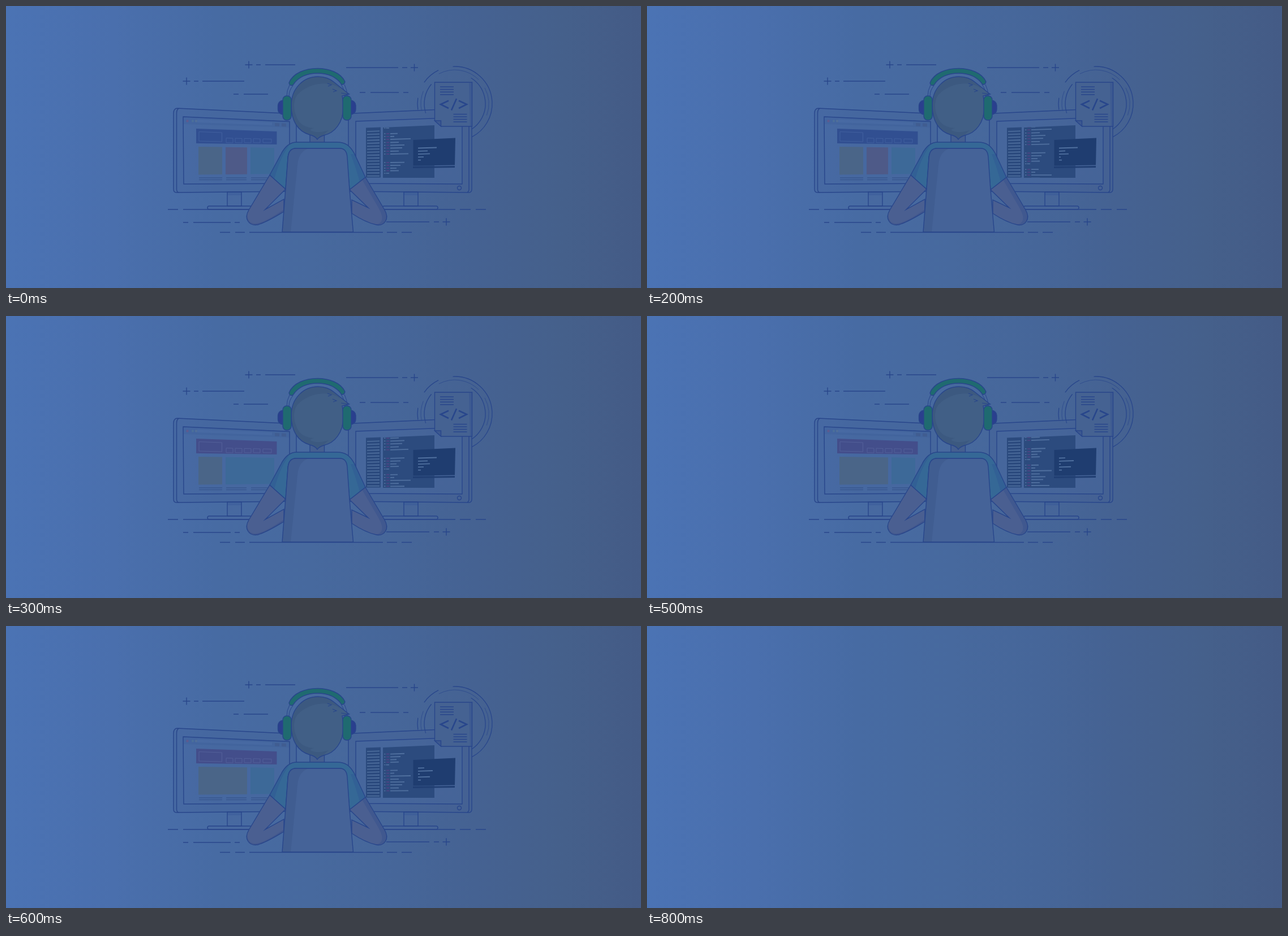
Recreate the animation shown at these times as an HTML page with a canvas. Size 1122x499 px, loop 0.9 s.

```html
<!DOCTYPE html>
<html lang="en">
<head>
<meta charset="utf-8">
<title>Developer at work</title>
<style>
html, body { margin: 0; width: 100%; height: 100%; overflow: hidden; background: #476a9f; }
canvas { display: block; width: 1122px; height: 499px; }
</style>
</head>
<body>
<canvas id="stage" width="1122" height="499"></canvas>
<script>
const ctx = document.getElementById('stage').getContext('2d');
const INK = '#28468b', GREEN = '#1f6a70', TEAL = '#356896', SKIN = '#4a5f91', PALE = '#50709f';
const OLIVE = '#4a6588', RED = '#4e5a88', AQUA = '#3d6998';
const STEP = 100, STEPS = 9;

function path(d, fill, stroke = INK, width = 1.4) {
  const p = new Path2D(d);
  if (fill) { ctx.fillStyle = fill; ctx.fill(p); }
  if (stroke) { ctx.strokeStyle = stroke; ctx.lineWidth = width; ctx.stroke(p); }
}

function box(x, y, w, h, r, fill, stroke = INK) {
  const p = new Path2D();
  p.roundRect(x, y, w, h, r);
  if (fill) { ctx.fillStyle = fill; ctx.fill(p); }
  if (stroke) { ctx.strokeStyle = stroke; ctx.lineWidth = 1.4; ctx.stroke(p); }
}

function arc(r, from, to, width) {
  ctx.beginPath();
  ctx.arc(793, 173, r, from * Math.PI / 180, to * Math.PI / 180);
  ctx.strokeStyle = INK;
  ctx.lineWidth = width;
  ctx.stroke();
}

const row = (y, ...spans) => {
  for (let i = 0; i < spans.length; i += 2) path(`M${spans[i]} ${y}H${spans[i + 1]}`, null, INK, 1.5);
};
const plus = (x, y) => path(`M${x - 6.5} ${y}h13M${x} ${y - 6.5}v13`);

function background() {
  const g = ctx.createLinearGradient(0, 0, 1122, 0);
  [[0, '#4b73b4'], [.17, '#4a6fad'], [.33, '#476ba3'], [.48, '#47699e'],
   [.62, '#466699'], [.74, '#456292'], [.88, '#45608b'], [1, '#445b86']]
    .forEach(([at, color]) => g.addColorStop(at, color));
  ctx.fillStyle = g;
  ctx.fillRect(0, 0, 1122, 499);
}

function surroundings() {
  plus(429, 104); row(104, 442, 450, 458, 511);
  plus(319, 133); row(133, 332, 340, 347, 421);
  row(156, 402, 411, 420, 463);
  row(109, 601, 693, 700, 709); plus(721.5, 109);
  row(153, 625, 635, 644, 694, 702, 711);
  row(360, 286, 304, 313, 432, 668, 794, 802, 821, 830, 848);
  row(383, 313, 322, 331, 397, 404, 413);
  row(382, 672, 748, 756, 765); plus(778, 382);
  row(400.5, 378, 396, 405, 422, 430, 666, 673, 691, 699, 717);
  arc(66, -93, 63, 1.3);
  arc(66, 215, 244, 1.3);
  arc(66, 171, 189, 1.3);
  arc(60, 242, 315, .7);
  arc(60, -28, 20, .7);
  arc(60, 168, 202, .7);
  arc(54, 162, 220, 1.3);
  arc(54, -58, 57, 1.3);
}

function stand(x, baseX, baseW) {
  box(x, 329, 25, 25, 0, 'rgba(70,100,155,.3)');
  ctx.fillStyle = 'rgba(39,69,143,.2)';
  ctx.fillRect(x, 329, 25, 6);
  box(baseX, 354, baseW, 6, 3, 'rgba(70,100,155,.3)');
}

function monitors() {
  stand(391, 356, 87);
  stand(703, 665, 98);

  const frame = 'rgba(64,92,148,.25)', screen = 'rgba(76,110,165,.2)';
  path('M303 181L505 190.500Q513 191 513 200V328L301 330Q296 330 296 324V190Q296 181 303 181Z', frame);
  path('M305 181.5Q301.500 183 301.500 190V324Q301.500 329 305 330');
  path('M313 196L501 204.500V314L314 315Z', screen);

  path('M605 328V196Q606 190 613 190L814 181Q823 181 823 190V324Q823 330 818 330Z', frame);
  path('M818 190V325Q818 328 815 330');
  path('M618 204L806 197V315L618 314Z', screen);
  ctx.beginPath();
  ctx.arc(801, 322, 3.5, 0, 7);
  ctx.stroke();
}

function card(x1, x2, color) {
  const top = x => 249 + (x - 340) * .014, bottom = x => 298.500 - (x - 340) * .01;
  path(`M${x1} ${top(x1)}L${x2} ${top(x2)}V${bottom(x2)}L${x1} ${bottom(x1)}Z`, color, null);
}

function browser(step) {
  path('M314 197L500 205V215L314 209Z', 'rgba(50,82,145,.18)', null);
  path('M338 200.500L470 206V211L338 206Z', 'rgba(95,130,180,.18)', null);
  [['#5f5a8e', 320.5], ['#4a6f9a', 330], ['#506f9b', 336]].forEach(([color, x]) => {
    ctx.beginPath();
    ctx.arc(x, 203.5, 2.2, 0, 7);
    ctx.fillStyle = color;
    ctx.fill();
  });
  path('M475 207L483 207.400V213L475 212.600ZM487 207.500L495 208V213.500L487 213Z', '#405d91', null);

  const violet = step >= 3 && step <= 6;
  path('M336 217L478.500 222V245L336 243Z', violet ? '#434e8b' : '#314f91', null);
  const trim = violet ? '#53609a' : '#41609f';
  path('M341 222.500L381.500 224V240L341 239Z', null, trim, 1);
  [389, 405, 421, 437, 454].forEach((x, i) => {
    const w = i === 4 ? 15 : 12, y = 233.7 + i * .35;
    path(`M${x} ${y}l${w} .4V242l-${w} -.3Z`, null, trim, 1);
  });

  const layouts = [
    [[340, 382, OLIVE], [388, 426, RED], [432, 474, AQUA]],
    [[340, 382, OLIVE], [388, 474, AQUA]],
    [[340, 426, OLIVE], [432, 474, AQUA]],
    [[340, 474, RED]]
  ];
  layouts[step < 3 ? 0 : step < 5 ? 1 : step < 7 ? 2 : 3].forEach(c => card(...c));
  [[341, 382], [389, 425], [433, 465]].forEach(([a, b]) =>
    path(`M${a} 304H${b}M${a} 307.500H${b}`, null, '#38578f', 1.3));
}

// Each pair is a row offset and the right end of its code line.
const code = [[0, 692], [5, 686], [10, 715], [15.5, 694], [20.5, 704], [25.5, 700], [31, 694], [36, 711],
              [51, 704], [56, 697], [61, 690], [65.5, 694], [70, 0]];

function editor(step) {
  path('M636 215.500L662 214.500V303.500H636Z', '#2b4a7e', null);
  for (let i = 0; i < 16; i++) {
    const y = 222 + i * 5.25;
    path(`M638 ${y}L660 ${y - .8 + i * .05}`, null, PALE, 1.6);
  }

  const panel = 'M666 215L757 211V304H666Z';
  path(panel, '#2c4b7e', null);
  ctx.save();
  ctx.clip(new Path2D(panel));
  const start = 226 - step * 8.4;
  for (let cycle = -1; cycle < 3; cycle++) {
    for (const [offset, end] of code) {
      const y = start + cycle * 80 + offset;
      if (y < 212 || y > 306) continue;
      const slope = -.04 * (304 - y) / 90;
      path(`M668 ${y}h2.5`, null, PALE, 1.4);
      if (end) {
        path(`M672 ${y}h5.500`, null, '#4a4583', 2);
        path(`M679 ${y}L${end} ${y + slope * (end - 679)}`, null, PALE, 1.8);
      } else path(`M671.500 ${y}h5.500`, null, PALE, 1.6);
    }
  }
  ctx.restore();

  path('M719.500 237L794 233.500L793 281.500L719.500 282.500Z', '#1f3d70', null);
  path('M719 284L793 283V286L719 287Z', '#213f73', null);
  const terminals = [[761, 745, 749, 738, 733], [761, 739, 745, 731, 733], [739, 754, 731, 749, 733]];
  const lines = terminals[step >= 5 ? 2 : step === 1 || step === 2 ? 1 : 0];
  lines.forEach((end, i) => {
    const y = 251.5 + i * 5.3;
    path(`M728 ${y}L${end} ${y - (end - 728) * .03}`, null, PALE, 1.8);
  });
}

function documentIcon() {
  path('M757.500 135H823.500V213H769L757.500 203Z', '#456292');
  path('M818 136H823V212H820Z', 'rgba(39,69,143,.25)', null);
  path('M757.500 203H768.500V213Z', '#3c5990');
  for (let i = 0; i < 4; i++) {
    row(143 + i * 4.6, 767, 791);
    row(191.5 + i * 4.5, 790.5, 814.5);
  }
  path('M782 167.500L768 174L782 181M796 164L787 184.500M800 167.500L814 174L800 181', null, INK, 2.6);
}

function arms() {
  path('M466 299L429 361C420 376 429 390 445 387C460 383 477 372 491 364V342L458 360L494 324Z', SKIN);
  path('M427 374C429 384 437 387 447 384C461 380 476 370 491 360V364C477 372 460 383 445 387C434 388 427 383 427 374Z', 'rgba(48,74,137,.4)', null);
  path('M635 303L669 361C678 376 669 390 654 387C640 384 623 375 611 367V343L640 357L607 325Z', SKIN);
  path('M635 303L669 361C678 376 669 390 654 387C671 382 664 368 657 355L629 307Z', 'rgba(48,74,137,.35)', null);
}

function body() {
  box(537, 225, 25.5, 18, 0, '#445f90');
  path('M466 299L486 262C493 248 502 241 514 241H585C600 241 608 247 616 262L635 303L607 325L602 268Q600 252 590 252H512Q499 252 498 270L494 324Z', TEAL);
  path('M616 262L635 303L625 311Q618 285 609 262Z', 'rgba(45,78,145,.3)', null);
  path('M466 299L486 262Q493 250 501 246Q485 266 474 306Z', 'rgba(45,78,145,.3)', null);
  const back = 'M488 400L494 324L498 270Q499 252 512 252H590Q602 252 603 268L607 325L613.500 400Z';
  path(back, '#456398', null);
  path('M488 400L494 324L498 270Q499 252 512 252H536Q517 256 515 282L503 400Z', '#405d91', null);
  path(back);
}

function head() {
  box(480.5, 167, 18, 25, 9, '#2a3f8e');
  box(600, 167, 18, 25, 9, '#2a3f8e');
  path('M501 140Q496 149 496 160M507 141Q500 149 500 160M598 139Q603 149 603 160M592 139Q599 149 599 160', null, INK, 1);

  const skull = 'M504 176C504 145 526 125 551 125C563 125 572 128 580 135L606 156L594 159Q596 168 596 179C596 206 581 225 561 229Q554 231 550 236Q546 230 537 228C516 222 504 204 504 176Z';
  path(skull, '#415f86', null);
  ctx.save();
  ctx.clip(new Path2D(skull));
  path('M504 120H582L590 146C570 130 530 137 513 160Q503 180 518 205Q528 216 545 216Q532 219 543 222Q552 225 570 220L550 238L500 230Z', '#3c5980', null);
  ctx.restore();
  path(skull);
  path('M568 137L575 139.500L569 142M577 147L584 150L578 152M592 154L606 156L596 159', null, INK, 1.1);

  path('M500 136C507 118 530 110.500 550 110.500C571 110.500 592 118 599 134Q598 139 593 139C583 124 566 119 550 119C533 119 516 125 507 140Q501 142 500 136Z', GREEN);
  box(489, 159, 15, 43, 7, GREEN);
  box(595, 159, 15, 43, 7, GREEN);
}

function draw(step) {
  background();
  if (step === STEPS - 1) return;
  surroundings();
  monitors();
  browser(step);
  editor(step);
  documentIcon();
  arms();
  body();
  head();
}

const begin = performance.now();
function tick() {
  draw(Math.floor((performance.now() - begin) / STEP) % STEPS);
  requestAnimationFrame(tick);
}
tick();
</script>
</body>
</html>
```
